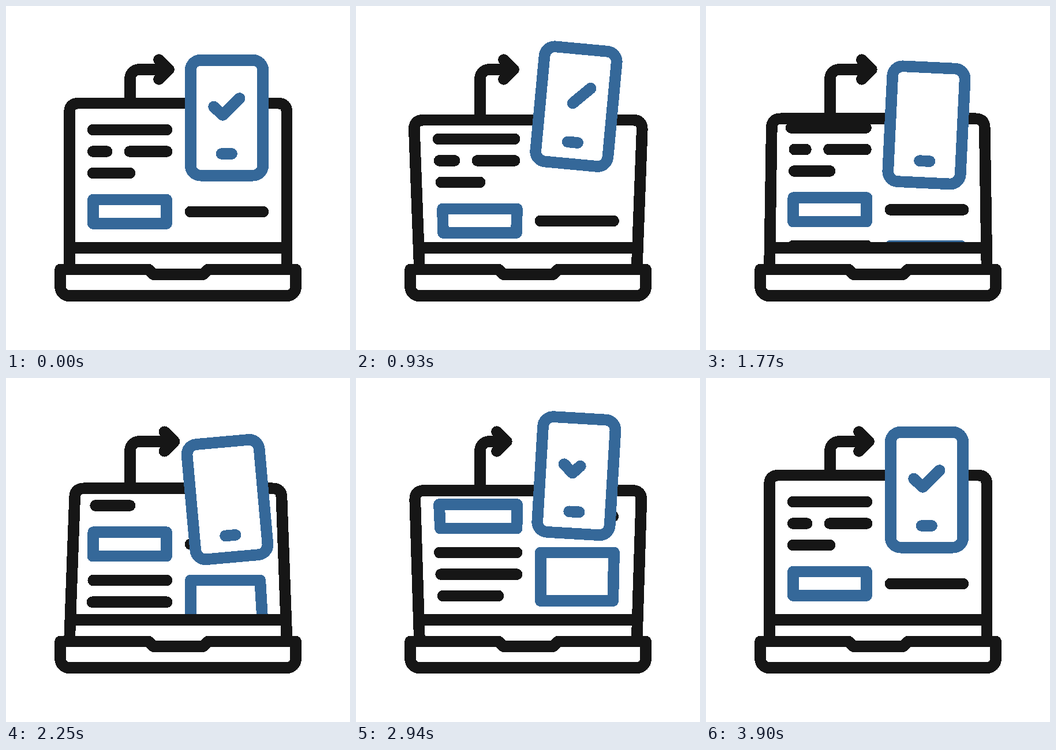
An HTML page that plays this animation: 596 px wide and 596 px high, repeating every 4.5 s.

```html
<!DOCTYPE html>
<html lang="en">
<head>
<meta charset="utf-8">
<title>Laptop and phone</title>
<style>
  html, body { margin: 0; width: 100%; height: 100%; overflow: hidden; background: #fff; }
  svg { display: block; width: 100vw; height: 100vh; shape-rendering: crispEdges; }
  path, rect { fill: none; stroke: #161616; stroke-width: 19.7; stroke-linejoin: round; }
  .round { stroke-linecap: round; }
  .blue { stroke: #356899; }
  #body { fill: #fff; }
</style>
</head>
<body>
<svg viewBox="0 0 596 596">
  <defs><clipPath id="inside"><path id="mask"/></clipPath></defs>
  <path id="arrow" class="round"/>
  <g id="page" clip-path="url(#inside)"></g>
  <path id="screen"/>
  <path d="M110 419H486.6"/>
  <path d="M94 456.6H247L256 465.2H341L350 456.6H502.2V486.3A16 16 0 0 1 486.2 502.3H110A16 16 0 0 1 94 486.3Z"/>
  <g id="phone">
    <rect id="body" class="blue" x="319.7" y="93.7" width="125.6" height="200" rx="17.5"/>
    <path class="blue round" d="M373.5 256H391"/>
    <path id="check" class="blue round" pathLength="1" d="M360 174.5L375.5 189L404.7 160"/>
  </g>
</svg>
<script>
const LOOP = 4500, STEP = 30;
const $ = id => document.getElementById(id);

// Smooth progress from a to b
function ease(t, a, b) {
  const p = Math.min(1, Math.max(0, (t - a) / (b - a)));
  return p * p * (3 - 2 * p);
}

// Eased track through [time, value] keys
const track = (...keys) => t => {
  let v = keys[0][1];
  for (let i = 1; i < keys.length; i++) {
    v += (keys[i][1] - keys[i - 1][1]) * ease(t, keys[i - 1][0], keys[i][0]);
  }
  return v;
};

// Track with evenly spaced keys that starts and ends at rest
const swing = (a, b, c) => track([270, 0], [1200, a], [2100, b], [3000, c], [3900, 0]);
const still = () => 0;

const lean = swing(-11.5, 10.5, -8);
const drop = swing(36.5, 22.5, 26.5);
const reach = swing(-11.3, 12, -21.5);
const scroll = track([270, 0], [1200, 20], [1390, 20], [2845, -119.3], [3900, 0]);
const lift = track([270, 0], [1200, -24.5], [2030, 24], [2940, -24], [3775, 0]);
const turn = track([270, 0], [1380, 8.3], [2260, -5.1], [3000, 3.55], [3900, 0]);

const items = [];

function add(cls, shape) {
  const el = document.createElementNS("http://www.w3.org/2000/svg", "path");
  el.setAttribute("class", cls);
  $("page").append(el);
  items.push({ el, shape });
}

function line(y, x1, x2, left = still, right = still) {
  add("round", (t, s) => `M${x1 + left(t)} ${y + s}H${x2 + right(t)}`);
}

function box(x1, y1, x2, y2, tl, tr, bl, br) {
  add("blue", (t, s) =>
    `M${x1 + tl(t)} ${y1 + s}L${x2 + tr(t)} ${y1 + s}L${x2 + br(t)} ${y2 + s}L${x1 + bl(t)} ${y2 + s}Z`);
}

const pull = swing(-5, 0, 0);
line(214.5, 150.7, 278.5, swing(-10, 0, 0), pull);
line(252, 150.7, 174.5, swing(-7.6, 7.2, 0), pull);
line(252, 214.5, 278.5, pull, pull);
line(289.5, 150.7, 214.5, swing(-4, 4.8, 0.5));
line(356.5, 319.5, 445.3, still, swing(1, 0, 0));
line(419, 150.7, 278.5, swing(0, 1, -6));
line(456.7, 150.7, 278.5, swing(0, -1, -3.5));
line(494, 150.7, 246.5);
box(150.9, 335.6, 278.1, 377.1, swing(-1, 1, -7), swing(1, 0, 1), swing(0, 0, -5), swing(0, 0, 0.5));
box(319.8, 419, 445.2, 502.7, still, swing(0, -5.5, 2), still, still);

function draw(t) {
  const d = lean(t), top = 168.5 + drop(t), s = scroll(t);
  const l = 110 + d, r = 486.6 - d;
  const frame = `M110 456L${l} ${top + 16}Q${l} ${top} ${l + 16} ${top}H${r - 16}Q${r} ${top} ${r} ${top + 16}L486.6 456`;
  $("screen").setAttribute("d", frame);
  $("mask").setAttribute("d", `M110 419L${l} ${top}H${r}L486.6 419Z`);

  const tip = 282 + reach(t);
  $("arrow").setAttribute("d",
    `M215 ${top}V126A16 16 0 0 1 231 110H${tip}M${tip - 17} 93.2L${tip} 110L${tip - 17} 126.8`);

  for (const { el, shape } of items) el.setAttribute("d", shape(t, s));

  $("phone").setAttribute("transform", `translate(0 ${lift(t)}) rotate(${turn(t)} 382.5 182.5)`);

  const from = t < 2000 ? ease(t, 570, 1470) : 0;
  const to = t < 2000 ? 1 : ease(t, 2410, 3310);
  const check = $("check");
  check.style.visibility = to - from > 0.001 ? "visible" : "hidden";
  check.setAttribute("stroke-dasharray", `${to - from} 2`);
  check.setAttribute("stroke-dashoffset", -from);
}

const start = performance.now();
function tick() {
  const t = (performance.now() - start) % LOOP;
  draw(Math.floor(t / STEP) * STEP);
  requestAnimationFrame(tick);
}
tick();
</script>
</body>
</html>
```
